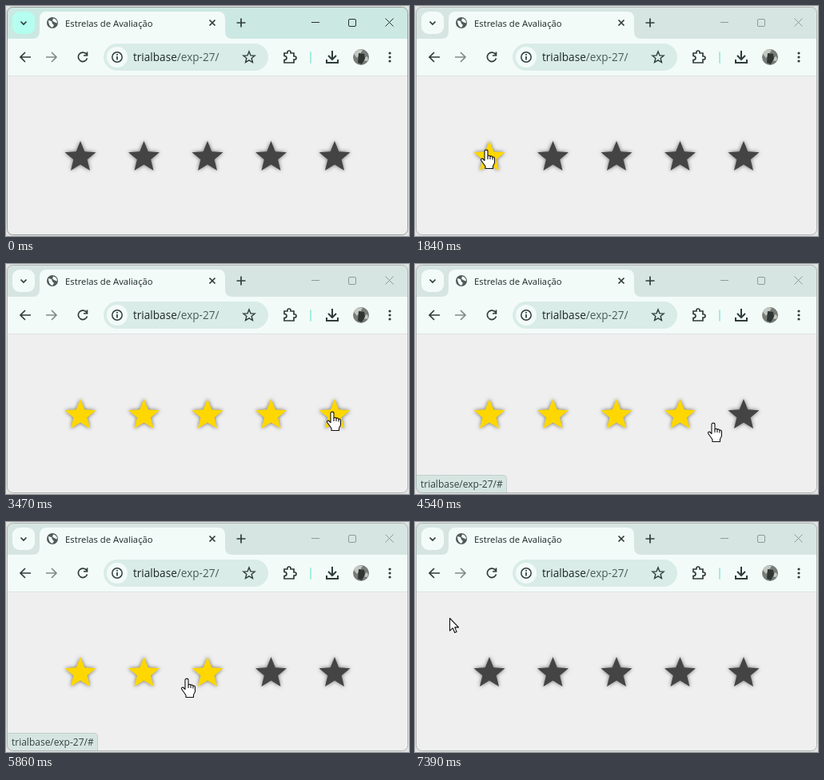
An HTML page that plays this animation: 504x288 px, repeating every 8740 ms.

```html
<!DOCTYPE html>
<html lang="pt">
<head>
<meta charset="utf-8">
<title>Estrelas de Avaliação</title>
<style>
  html, body { margin: 0; width: 100%; height: 100%; overflow: hidden; background: #e2e4e3; }
  svg { display: block; width: 504px; height: 288px; }
  text { font-family: "Open Sans", "Noto Sans", sans-serif; fill: #1d2826; }
  .line { fill: none; stroke: #2f3d3a; stroke-width: 1.7; }
  .thin { fill: none; stroke-width: 1; }
  .star { fill: #444; filter: drop-shadow(0 0 2.5px rgba(0, 0, 0, .55)); }
  .star.on { fill: #ffd700; }
  .cursor path { fill: #fff; stroke: #111; stroke-width: 1.1; stroke-linejoin: round; }
</style>
</head>
<body>
<svg viewBox="0 0 504 288">
  <defs>
    <clipPath id="win"><rect x="1.5" y="1.5" width="501" height="285" rx="7"/></clipPath>
    <g id="controls" class="thin">
      <path d="M382 20.5h10M474.500 15.500l10 10m0-10l-10 10"/>
      <rect x="428.500" y="16.500" width="9" height="9" rx="1.500"/>
    </g>
    <rect id="menu" x="8" y="7" width="28" height="28" rx="9"/>
  </defs>

  <g clip-path="url(#win)">
    <rect width="504" height="288" fill="#efefef"/>
    <rect width="504" height="42" fill="#d6e5e1"/>
    <use href="#menu" fill="#f3fbf9"/>
    <use href="#controls" stroke="#8f9a97"/>
    <g id="focus">
      <rect width="504" height="42" fill="#cce8e2"/>
      <use href="#menu" fill="#b4fff0"/>
      <use href="#controls" stroke="#26312f"/>
    </g>

    <!-- tab strip -->
    <path d="M33 41q9 0 9-9V16q0-9 9-9H265q9 0 9 9V32q0 9 9 9z" fill="#f3fbf9"/>
    <path class="line" d="M18.500 19.500l3.500 3.500 3.500-3.500"/>
    <circle cx="58" cy="21" r="7" fill="#505b59"/>
    <path d="M53 18l4 1 1 3 2 2-2 3q-5-2-5-9zM59 15.500q5 1 5 6l-3-1-3-2z" fill="#f3fbf9"/>
    <text x="74" y="25.500" font-size="11.3">Estrelas de Avaliação</text>
    <path class="line" stroke-width="1.500" d="M254.500 17.500l7 7m0-7l-7 7M288.500 21h11M294 15.500v11"/>

    <!-- toolbar -->
    <rect y="41" width="504" height="46" fill="#f3fbf9"/>
    <rect y="87" width="504" height="1" fill="#dde4e2"/>
    <path class="line" d="M31 64H18.500M24 58l-6 6 6 6"/>
    <path class="line" style="stroke:#7f8d8a" d="M50 64h12.500M57 58l6 6-6 6"/>
    <path class="line" d="M100.700 60.500A5.700 5.700 0 1 0 101.500 65.500M101.500 57.500v4.500h-4.500"/>
    <rect x="122" y="47" width="206" height="34" rx="17" fill="#d9ece7"/>
    <circle cx="139" cy="64" r="13" fill="#f3fbf9"/>
    <circle class="line" style="stroke-width:1.500" cx="139" cy="64" r="6.200"/>
    <path class="line" d="M139 63v4.500M139 60v1.700"/>
    <text x="159" y="69" font-size="13.6">trialbase<tspan fill="#4c5c58">/exp-27/</tspan></text>
    <path id="mark" class="line" style="stroke-width:1.400"/>
    <path class="line" d="M348 59h4v-1q0-2 2-2t2 2v1h4v4h1q2 0 2 2t-2 2h-1v4H348v-3.500q3 0 3-2.500t-3-2.500z"/>
    <rect x="380" y="57" width="2" height="15" rx="1" fill="#a3eee0"/>
    <path class="line" style="stroke-width:2" d="M408 56v10.500M403 62l5 5 5-5M401 67v4h14v-4"/>
    <circle cx="444" cy="64" r="10" fill="#777c78"/>
    <path d="M435 60q4-8 11-5l-3 5-4 5zM446 68l5-5q3 2 1 6z" fill="#c4c8c1"/>
    <path d="M441 59l7 1 1 6-4 7-5-2z" fill="#303633"/>
    <g fill="#2f3d3a"><circle cx="480" cy="59" r="1.600"/><circle cx="480" cy="64" r="1.600"/><circle cx="480" cy="69" r="1.600"/></g>

    <g id="stars"></g>

    <g id="bubble" opacity="0">
      <path d="M1 264.500H110q4.500 0 4.500 4.500V287H1z" fill="#d6e5e1" stroke="#c3cfcb"/>
      <text x="7" y="280" font-size="12" style="fill:#34423f">trialbase/exp-27/#</text>
    </g>
  </g>
  <rect id="edge" x="1.500" y="1.500" width="501" height="285" rx="7" fill="none" stroke="#adb3b1"/>

  <g id="pointer" class="cursor">
    <path id="arrow" d="M.5.5V16.200L4.200 12.800 6.700 18.500 9.100 17.400 6.700 11.900H11.500z"/>
    <g id="hand">
      <path d="M-2 2C-2-.5 2-.5 2 2V8C3 6.800 5 7 5 8.500 6 7.500 8 7.800 8 9.500 9 8.600 10.500 9 10.500 11V16C10.500 18 8.500 19 8.500 21V23.500H-1V21C-2 19-4.500 16-6.500 13-7 11-4.500 10.500-3.500 12L-2 13.500z"/>
      <path d="M2 8v4M5 8.500V12M8 9.500V12.500" style="fill:none"/>
    </g>
  </g>
</svg>
<script>
const LOOP = 8740;
const CENTERS = [93, 172.5, 252, 331.5, 411];
const $ = id => document.getElementById(id);

// time, x, y of the pointer's hot spot
const PATH = [
  [1020, 87, 292], [1350, 62, 236], [1580, 34, 193], [1840, 89, 180], [1940, 94, 185],
  [1990, 95, 185], [2410, 178, 176], [2860, 287, 182], [2920, 289, 182],
  [3470, 408, 185], [3770, 438, 192], [3840, 439, 193], [3990, 439, 193],
  [4340, 373, 199], [4540, 373, 199], [4920, 460, 205], [5180, 440, 203],
  [5410, 410, 198], [5860, 226, 196], [6330, 111, 204], [6530, 54, 209],
  [6890, 54, 209], [7100, 36, 170], [7390, 43, 120]
];

function starPath(cx, cy, outer, inner) {
  let d = "";
  for (let i = 0; i < 10; i++) {
    const r = i % 2 ? inner : outer, a = Math.PI * (i / 5 - .5);
    d += (i ? "L" : "M") + (cx + r * Math.cos(a)).toFixed(2) + " " + (cy + r * Math.sin(a)).toFixed(2);
  }
  return d + "z";
}

const ramp = (t, a, b) => Math.min(1, Math.max(0, (t - a) / (b - a)));

function pointAt(t) {
  const i = PATH.findIndex(p => p[0] > t);
  if (i < 0) return PATH[PATH.length - 1].slice(1);
  if (i === 0) return PATH[0].slice(1);
  const a = PATH[i - 1], b = PATH[i], k = ramp(t, a[0], b[0]);
  return [a[1] + (b[1] - a[1]) * k, a[2] + (b[2] - a[2]) * k];
}

$("mark").setAttribute("d", starPath(304, 64.5, 7.5, 3.3));
const stars = CENTERS.map(x => {
  const s = document.createElementNS("http://www.w3.org/2000/svg", "path");
  s.setAttribute("class", "star");
  s.setAttribute("d", starPath(x, 189.5, 20.5, 9));
  return $("stars").appendChild(s);
});

function draw(t) {
  const [x, y] = pointAt(t);
  const over = x > 53 && x < 451 && y > 160 && y < 222;
  const rating = over ? CENTERS.filter((c, i) => i === 0 || x > c - 37.5).length : 0;
  stars.forEach((s, i) => s.classList.toggle("on", i < rating));

  $("pointer").setAttribute("transform", `translate(${Math.round(x)} ${Math.round(y)})`);
  $("pointer").style.display = t < PATH[0][0] ? "none" : "";
  $("arrow").style.display = over ? "none" : "";
  $("hand").style.display = over ? "" : "none";

  const active = t < 210 ? 1 : t < 270 ? .5 : 0;
  $("focus").setAttribute("opacity", active);
  $("edge").setAttribute("stroke", active === 1 ? "#949d9a" : "#adb3b1");
  $("bubble").setAttribute("opacity", ramp(t, 4040, 4340) - ramp(t, 7140, 7380));
}

const start = performance.now();
function tick() {
  draw((performance.now() - start) % LOOP);
  requestAnimationFrame(tick);
}
tick();
</script>
</body>
</html>
```
